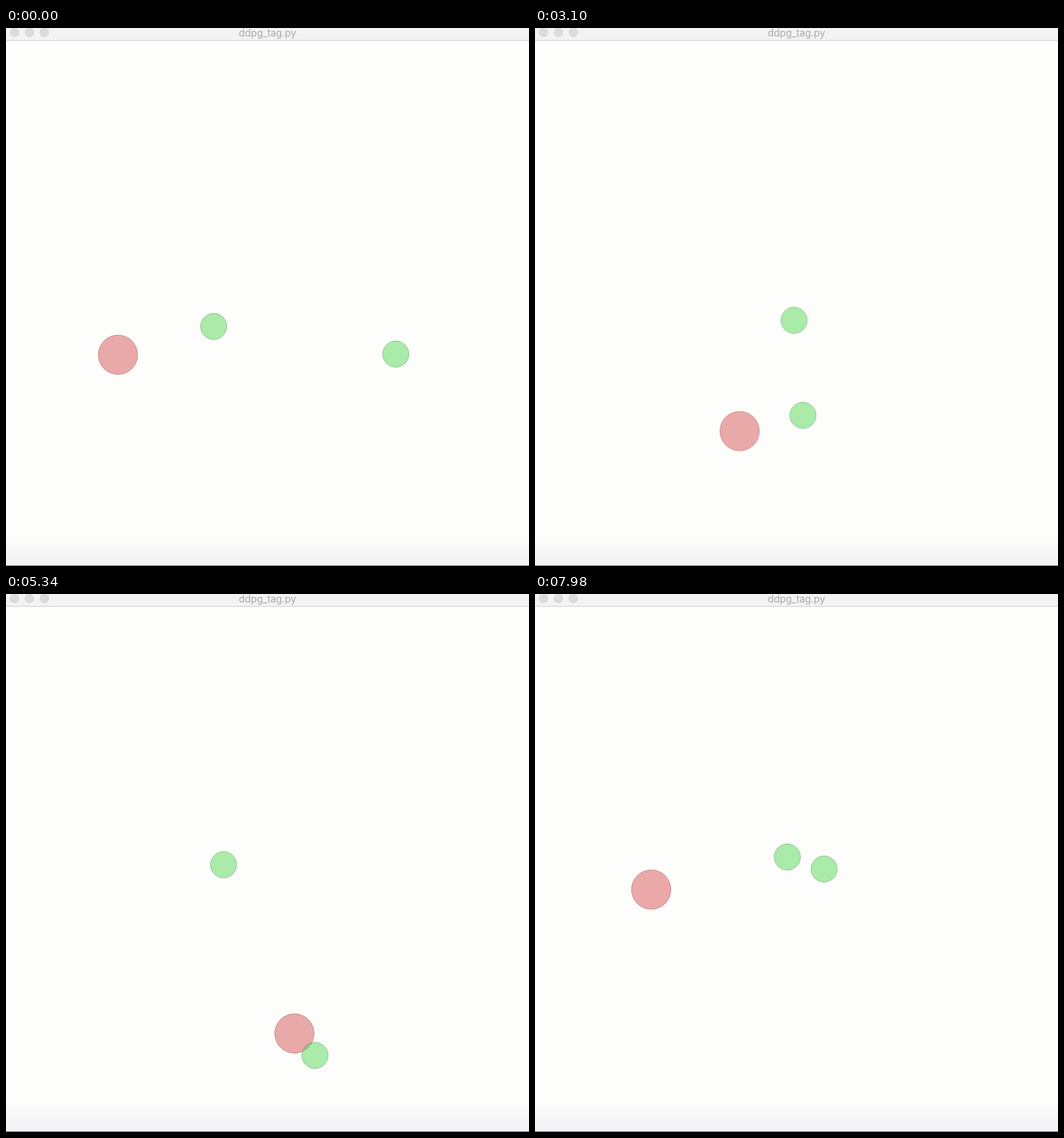
An HTML page for the animation above (8 s loop, 738 by 759 pixels).

```html
<!DOCTYPE html>
<html lang="en">
<head>
<meta charset="utf-8">
<title>Tag</title>
<style>
  html, body { margin: 0; width: 100%; height: 100%; overflow: hidden; background: #fdfdfc; }
  svg { display: block; width: 738px; height: 759px; }
  .title { font: 13.8px Inter, "Open Sans", sans-serif; fill: #a8a8a8; text-anchor: middle; }
  .lights { fill: #dcdcdc; stroke: #d2d2d2; stroke-width: .7; }
  .red { fill: rgba(215, 87, 87, .5); stroke: rgba(108, 44, 44, .35); }
  .green { fill: rgba(89, 217, 89, .5); stroke: rgba(44, 108, 44, .35); }

  /* One second of each paused animation stands for one step. */
  .agent {
    animation: var(--path) 171s cubic-bezier(.4, .2, .6, .8) both paused;
    animation-delay: calc(var(--step, 0) * -1s);
  }
  @keyframes chase {
    0% { transform: translate(158px, 461px); }
    12.87% { transform: translate(364px, 411px); }
    28.65% { transform: translate(458px, 655px); }
    50.29% { transform: translate(107px, 476px); }
    67.25% { transform: translate(407px, 620px); }
    81.87% { transform: translate(327px, 303px); }
    100% { transform: translate(164px, 417px); }
  }
  @keyframes dodge {
    0% { transform: translate(293px, 421px); }
    12.87% { transform: translate(344px, 261px); }
    28.65% { transform: translate(420px, 489px); }
    50.29% { transform: translate(307px, 330px); }
    67.25% { transform: translate(307px, 382px); }
    81.87% { transform: translate(291px, 229px); }
    100% { transform: translate(356px, 371px); }
  }
  @keyframes flee {
    0% { transform: translate(550px, 460px); }
    12.87% { transform: translate(615px, 399px); }
    28.65% { transform: translate(596px, 532px); }
    50.29% { transform: translate(144px, 562px); }
    67.25% { transform: translate(436px, 651px); }
    81.87% { transform: translate(448px, 363px); }
    100% { transform: translate(408px, 388px); }
  }
</style>
</head>
<body>
<svg viewBox="0 0 738 759">
  <defs>
    <linearGradient id="floor" x2="0" y2="1">
      <stop offset="0" stop-color="#fdfdfc"/>
      <stop offset="1" stop-color="#f2f2f5"/>
    </linearGradient>
  </defs>
  <rect width="738" height="759" fill="#fdfdfc"/>
  <rect y="716" width="738" height="42" fill="url(#floor)"/>
  <rect y="758" width="738" height="1" fill="#777073"/>
  <rect width="738" height="17" fill="#f3f3f4"/>
  <rect y="17" width="738" height="1" fill="#d2d2d2"/>
  <g class="lights">
    <circle cx="12" cy="6.3" r="6.2"/>
    <circle cx="33" cy="6.3" r="6.2"/>
    <circle cx="54" cy="6.3" r="6.2"/>
  </g>
  <text class="title" x="369" y="11.5">ddpg_tag.py</text>
  <circle class="agent red" r="27.8" style="--path: chase"/>
  <circle class="agent green" r="18.5" style="--path: dodge"/>
  <circle class="agent green" r="18.5" style="--path: flee"/>
</svg>
<script>
  const LOOP = 8000;

  // Steps advance in a repeating rhythm of 20, 100 and 20 ms.
  function stepAt(ms) {
    const beat = ms % 140;
    return Math.floor(ms / 140) * 3 + (beat >= 20) + (beat >= 120);
  }

  function draw() {
    const step = stepAt(performance.now() % LOOP);
    document.documentElement.style.setProperty('--step', step);
    requestAnimationFrame(draw);
  }
  draw();
</script>
</body>
</html>
```
